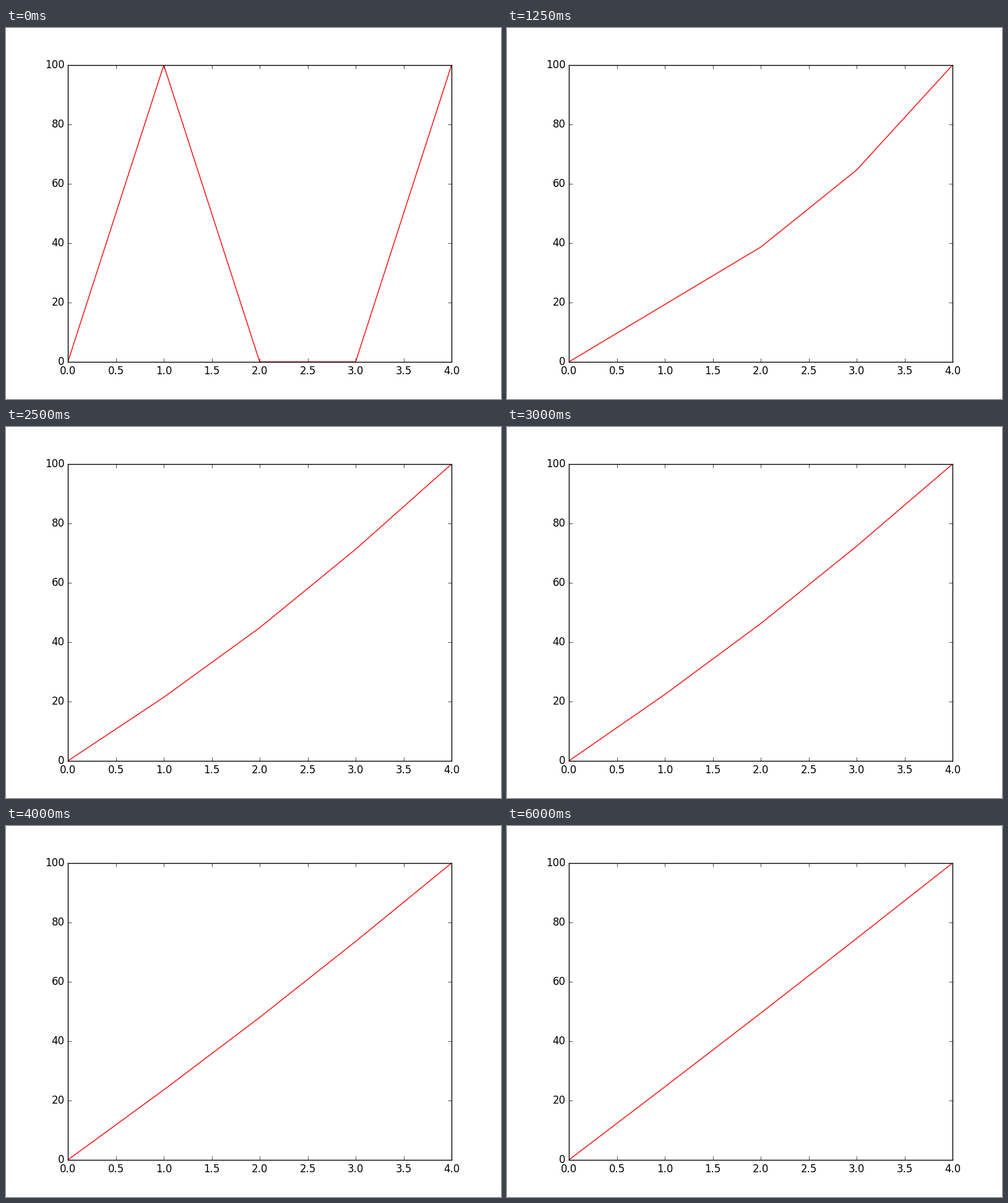
Recreate the animation shown at these times as a matplotlib script. Size 800 px wide and 600 px high, loop 6.25 s.

```python
import numpy as np
import matplotlib.pyplot as plt
from matplotlib.animation import FuncAnimation

FRAMES = 25
INTERVAL = 250  # ms
R = 0.25        # diffusion number of the explicit scheme

plt.style.use("classic")
plt.rcParams["font.family"] = "DejaVu Sans"


def diffuse(steps):
    """Temperature along the rod, with both ends held fixed."""
    u = np.array([0.0, 100.0, 0.0, 0.0, 100.0])
    for _ in range(steps):
        u[1:-1] += R * (u[:-2] - 2 * u[1:-1] + u[2:])
    return u


fig, ax = plt.subplots(figsize=(8, 6), dpi=100, facecolor="white")
ax.set_xlim(0, 4)
ax.set_ylim(0, 100)
line, = ax.plot(np.arange(5), diffuse(0), "r-")


def update(i):
    line.set_ydata(diffuse(i))
    return line,


anim = FuncAnimation(fig, update, frames=FRAMES, interval=INTERVAL,
                     repeat=True, repeat_delay=0)
plt.show()
```
